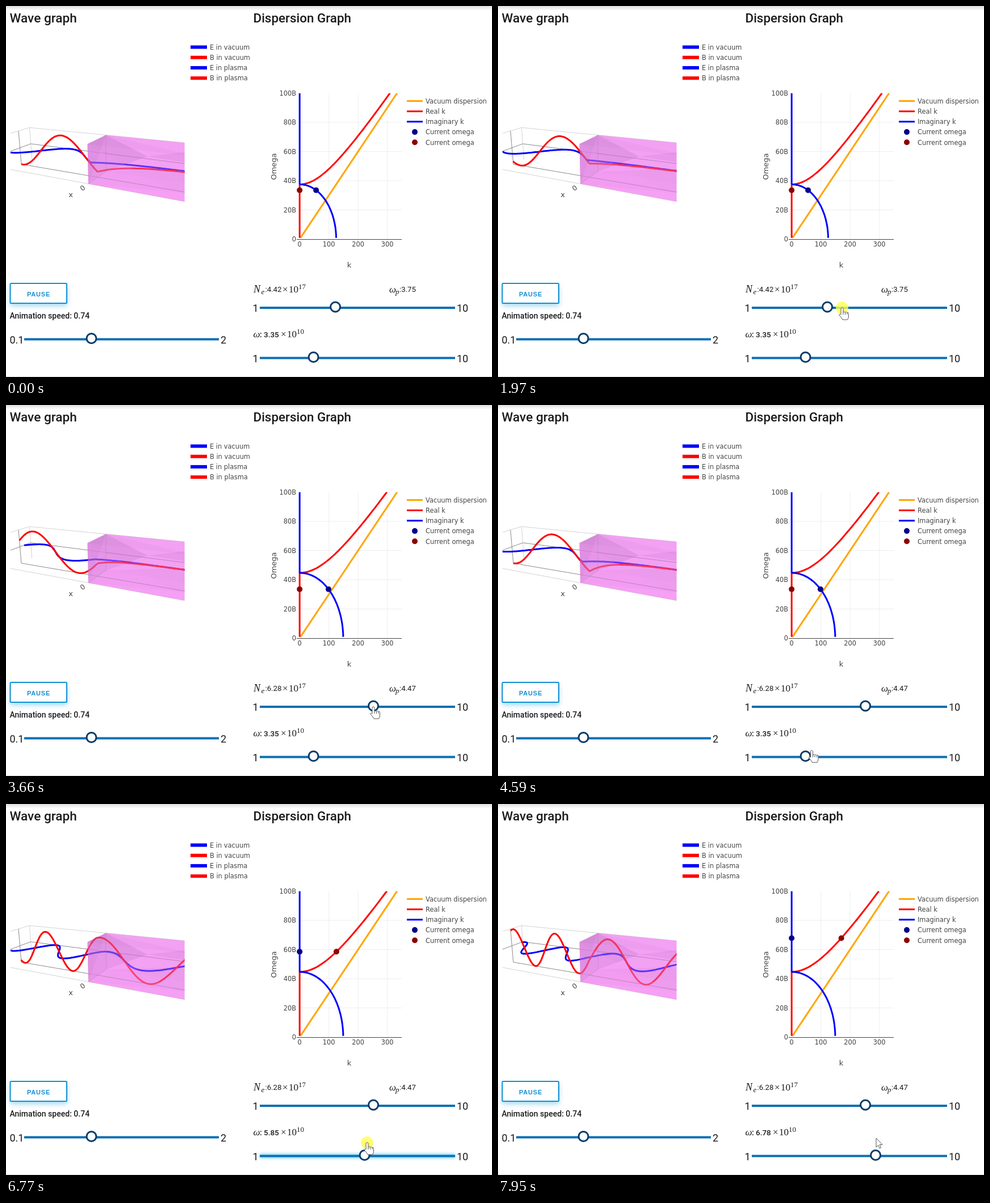
An HTML page that plays this animation: 856 px wide and 654 px high, repeating every 8 s.

```html
<!DOCTYPE html>
<html lang="en">
<head>
<meta charset="utf-8">
<title>Wave and dispersion</title>
<style>
  html, body { margin: 0; width: 100%; height: 100%; overflow: hidden; background: #fff; }
  svg { display: block; width: 100vw; height: 100vh; }
  .plot { font-family: "DejaVu Sans", sans-serif; font-size: 11.4px; fill: #444; }
  .ui { font-family: Roboto, sans-serif; fill: #1b1b1b; }
  .math { font-family: "Liberation Serif", serif; fill: #1b1b1b; font-size: 17px; }
  .it { font-style: italic; }
  .thin, .dark { fill: none; stroke: #d2d2d2; stroke-width: 1; }
  .dark { stroke: #8a8a8a; }
  .faint { stroke-opacity: .35; }
  .wave { fill: none; stroke-width: 3; stroke-linejoin: round; }
</style>
</head>
<body>
<svg id="stage" viewBox="0 0 856 654"></svg>
<script>
const LOOP = 8000;
const BLUE = '#0000ff', RED = '#ff0000', NAVY = '#00008b', MAROON = '#8b0000';
const stage = document.getElementById('stage');

// [first, last, count] of evenly spaced picture updates
const BURSTS = [[70, 870, 12], [940, 1730, 11], [1890, 2660, 11], [2830, 3580, 11],
  [3660, 4440, 11], [4530, 5320, 11], [5380, 6160, 11], [6240, 7020, 11],
  [7090, 7490, 6], [7640, 7950, 5]];
const ticks = [0];
for (const [a, b, n] of BURSTS)
  for (let i = 0; i < n; i++) ticks.push(a + (b - a) * i / (n - 1));

// Keys: [time, value, ...]
const PHASE = [[0, -2.35], [1098, 8.26], [1967, 17.01], [3660, 33.3], [5614, 50.37],
  [6786, 63.05], [7950, 83.42]];
const DENSITY = [[2010, 4.42], [2030, 5.15], [2400, 5.26], [3400, 6.28]];
const OMEGA = [[5300, 3.35], [5614, 3.69], [6160, 4.95], [6786, 5.85], [7020, 6.1], [7450, 6.78]];
const POINTER = [[0, 750, 675], [100, 735, 640], [870, 606, 548], [1090, 603, 542],
  [1500, 603, 542], [1890, 606, 532], [2030, 606, 532], [2400, 611, 532], [3400, 647, 532],
  [3700, 647, 532], [4440, 560, 605], [4850, 542, 615], [5250, 542, 615], [5614, 566, 614],
  [6160, 603, 606], [6786, 636, 597], [7020, 643, 596], [7450, 665, 595], [7700, 666, 589]];

function at(keys, t, col = 1) {
  const i = keys.findIndex(k => k[0] > t);
  if (i < 0) return keys[keys.length - 1][col];
  if (i === 0) return keys[0][col];
  const a = keys[i - 1], b = keys[i];
  return a[col] + (b[col] - a[col]) * (t - a[0]) / (b[0] - a[0]);
}
const within = (t, a, b) => t >= a && t < b;

// Perspective view: x along the wave, plasma starts at x = 0
function project(x, y, z) {
  const d = 1 - .15 * x + .052 * y - .0173 * z;
  return [(161 + 132.8 * x + 24.2 * y - 3.28 * z) / d,
          (269 - 18.5 * x + 4.5 * y - 38.06 * z) / d];
}
const fix = p => p.map(v => v.toFixed(1)).join(' ');
const path = pts => 'M' + pts.map(fix).join('L');
const solid = pts => path(pts.map(p => project(...p)));
function curve(f, a, b, n = 120) {
  return path(Array.from({ length: n + 1 }, (_, i) => f(a + (b - a) * i / n)));
}

// Dispersion axes
const kx = k => 517.2 + k * .515;
const wy = w => 411 - w * 2.575;
const sliderX = v => 457 + (v - 1) * 36;

const text = (x, y, s, cls, extra = '') => `<text x="${x}" y="${y}" class="${cls}" ${extra}>${s}</text>`;
const line = (x1, y1, x2, y2, color, w) =>
  `<line x1="${x1}" y1="${y1}" x2="${x2}" y2="${y2}" stroke="${color}" stroke-width="${w}"/>`;
const edge = (cls, ...pts) => `<path class="${cls}" d="${solid(pts)}"/>`;
const face = (color, alpha, ...pts) => `<path d="${solid(pts)}Z" fill="${color}" fill-opacity="${alpha}"/>`;
const dot = (id, x, y, color) => `<circle id="${id}" cx="${x}" cy="${y}" r="5" fill="${color}"/>`;
const wave = (id, color) => `<path id="${id}" class="wave" stroke="${color}"/>`;

function slider(id, x1, x2, y, lo, hi, xLo, knob) {
  return `<line id="${id}Glow" x1="${x1}" y1="${y}" x2="${x2}" y2="${y}" stroke="#55c3f2" stroke-opacity=".7" stroke-width="8" filter="url(#soft)" visibility="hidden"/>`
    + line(x1, y, x2, y, '#0c6fb2', 4)
    + text(xLo, y + 7, lo, 'ui', 'font-size="18"') + text(x2 + 3, y + 7, hi, 'ui', 'font-size="18"')
    + `<circle id="${id}Knob" cx="${knob}" cy="${y - 1.5}" r="8.5" fill="#fff" stroke="#073b69" stroke-width="3"/>`;
}

function power(x, y, exp) {
  return text(x, y, '×', 'math') + text(x + 11, y, '10', 'math')
    + text(x + 28, y - 6, exp, 'math', 'style="font-size:13px"');
}

function waveScene() {
  const violet = '#ee82ee', shade = '#7a4a86';
  const A = [0, -1, 1], B = [0, 1, 1], C = [0, 1, -1], D = [0, -1, -1];
  const A2 = [1, -1, 1], B2 = [1, 1, 1], C2 = [1, 1, -1], D2 = [1, -1, -1];
  const mid = [.45, 1, .12];
  return `<g clip-path="url(#view)">`
    + edge('thin', [-1, -1, 1], [-1, 1, 1], B2)
    + edge('thin', [-1, 1, 1], [-1, 1, -1])
    + edge('thin', [-1, -1, -1], D2)
    + edge('dark', [-1, -1, 0], [-1, 1, 0], [1, 1, 0])
    + edge('dark', [-1, 0, 1], [-1, 0, -1], [1, 0, -1])
    + face(violet, .6, A, B, B2, D2, D)
    + face(shade, .2, B, mid, C)
    + face(shade, .14, mid, [1, 1, .8], [1, 1, .05])
    + face(shade, .1, C, [1, 1, -.1], C2)
    + face(shade, .07, D, C, C2, [1, 0, -1])
    + wave('eVac', BLUE) + wave('bVac', RED) + wave('ePla', BLUE) + wave('bPla', RED)
    + face(violet, .38, A, B, B2, D2, D)
    + face(shade, .14, A, B, C, D)
    + face(shade, .08, A, B, D)
    + face(shade, .05, A, B, A2)
    + face('#ff9cff', .16, A, D2, D)
    + edge('dark faint', B, C, D)
    + edge('dark faint', [0, 1, 0], [1, 1, 0])
    + edge('dark faint', [0, 0, -1], [1, 0, -1])
    + `</g>`
    + text(0, 4, '0', 'plot', 'text-anchor="middle" transform="translate(135 321) rotate(-35)" style="font-size:12px"')
    + text(114, 337, 'x', 'plot', 'text-anchor="middle" style="font-size:13px"');
}

function waveLegend() {
  return ['E in vacuum', 'B in vacuum', 'E in plasma', 'B in plasma'].map((s, i) => {
    const y = 72.5 + i * 18.2;
    return line(325, y, 354, y, i % 2 ? RED : BLUE, 6) + text(359, y + 4.2, s, 'plot');
  }).join('');
}

function dispersion() {
  let s = '';
  for (let k = 0; k <= 300; k += 100) {
    if (k) s += line(kx(k), 153.5, kx(k), 411, '#eee', 1);
    s += text(kx(k), 424, k, 'plot', 'text-anchor="middle"');
  }
  for (let w = 0; w <= 100; w += 20) {
    if (w && w < 100) s += line(517, wy(w), 697, wy(w), '#eee', 1);
    s += text(511, wy(w) + 4, w ? w + 'B' : 0, 'plot', 'text-anchor="end"');
  }
  s += line(512, 411.5, 697, 411.5, '#444', 1)
    + `<g clip-path="url(#axes)">` + line(kx(3), wy(.9), kx(333.3), wy(100), '#ffa500', 3)
    + wave('realK', RED) + wave('imagK', BLUE) + `</g>`
    + dot('dotIm', 0, 0, NAVY) + dot('dotRe', 0, 0, MAROON)
    + text(0, 0, 'Omega', 'plot', 'text-anchor="middle" transform="translate(475.5 283) rotate(-90)" style="font-size:13px"')
    + text(604.5, 461, 'k', 'plot', 'text-anchor="middle" style="font-size:13px"');
  ['Vacuum dispersion', 'Real k', 'Imaginary k', 'Current omega', 'Current omega'].forEach((label, i) => {
    const y = 167.5 + i * 18.2;
    s += i < 3 ? line(706, y, 734, y, ['#ffa500', RED, BLUE][i], 3)
               : dot('key' + i, 720, y, i === 3 ? NAVY : MAROON);
    s += text(739, y + 4.2, label, 'plot');
  });
  return s;
}

function controls() {
  return `<rect x="7" y="493" width="101" height="36" rx="2" fill="#6cc4ee" opacity=".6" filter="url(#softer)"/>
    <rect x="7.5" y="489" width="99.5" height="35" rx="1.5" fill="#fff" stroke="#0d90d4" stroke-width="2"/>`
    + text(57.5, 511.5, 'PAUSE', 'pause', 'text-anchor="middle" font-family="Liberation Sans, sans-serif" font-weight="700" font-size="11" letter-spacing=".8" fill="#148fd2"')
    + text(6.5, 550.5, 'Animation speed: 0.74', 'ui', 'font-size="14" font-weight="500"')
    + slider('speed', 32, 375, 587.5, '0.1', '2', 6.5, 150.5)
    + text(436, 505, 'N', 'math it', 'style="font-size:18px"') + text(449.5, 508, 'e', 'math it', 'style="font-size:13px"')
    + text(456.5, 504, '', 'ui', 'id="density" font-size="13.2"') + power(487, 505, 17)
    + text(675, 505, 'ω', 'math it') + text(686, 508, 'p', 'math it', 'style="font-size:13px"')
    + text(693, 504, '', 'ui', 'id="plasma" font-size="13.2"')
    + slider('ne', 447, 791, 532, 1, 10, 434.5, 580)
    + text(435.5, 584, 'ω', 'math it') + text(447, 583.5, ':', 'ui', 'font-size="14" font-weight="500"')
    + text(454, 583.5, '', 'ui', 'id="omega" font-size="13.5" font-weight="500"') + power(484, 584, 10)
    + slider('om', 447, 791, 620.5, 1, 10, 434.5, 541.6);
}

const blur = (id, size) => `<filter id="${id}" filterUnits="userSpaceOnUse" x="0" y="470" width="856" height="184">
    <feGaussianBlur stdDeviation="${size}"/></filter>`;

stage.innerHTML = `<defs>
    <clipPath id="view"><rect x="8" y="150" width="306.5" height="240"/></clipPath>
    <clipPath id="axes"><rect x="514" y="153.5" width="184" height="258"/></clipPath>
    ${blur('soft', 2.5)}${blur('softer', 4)}
    <linearGradient id="top" x2="0" y2="1"><stop stop-color="#dedede"/><stop offset="1" stop-color="#fff"/></linearGradient>
  </defs>
  <rect width="856" height="654" fill="#fff"/><rect width="856" height="8" fill="url(#top)"/>`
  + line(0, 653.5, 856, 653.5, '#dcdcdc', 1)
  + text(6.5, 29, 'Wave graph', 'ui', 'font-size="22.6" font-weight="500"')
  + text(435.5, 29, 'Dispersion Graph', 'ui', 'font-size="22.4" font-weight="500"')
  + waveLegend() + waveScene() + dispersion() + controls()
  + `<g id="pointer" fill="#fff" stroke="#555" stroke-width="1" stroke-linejoin="round">
    <circle id="press" r="11" fill="#ffff50" fill-opacity=".8" stroke="none"/>
    <path id="arrow" d="M0 0V16L3.7 12.5 6 18 8.5 17 6.2 11.5H11Z"/>
    <path id="hand" d="M-2 1q2-3 4 0V8q2-2 3.5 0 2-1.5 3.5.5 2.5-1 2.5 2V15q0 3-2 6H1Q-1 17-5 13q0-3 3-1ZM2 8v4M5.5 8.5v3.5M9 9v3"/>
  </g>`;

const el = {};
stage.querySelectorAll('[id]').forEach(n => el[n.id] = n);
const set = (id, attrs) => { for (const a in attrs) el[id].setAttribute(a, attrs[a]); };
const show = (id, on) => set(id, { visibility: on ? 'visible' : 'hidden' });

function drawWaves(w, wp, phase) {
  const half = .05, scale = 10 / .3 * half;
  const k = w * scale, kp = Math.sqrt(Math.abs(w * w - wp * wp)) * scale;
  const vac = x => Math.cos(k * x - phase);
  const pla = x => w > wp ? Math.cos(kp * x - phase) : Math.cos(phase) * Math.exp(-kp * x);
  set('eVac', { d: curve(x => project(x, vac(x), 0), -1, 0) });
  set('bVac', { d: curve(x => project(x, 0, vac(x)), -1, 0) });
  set('ePla', { d: curve(x => project(x, pla(x), 0), 0, 1) });
  set('bPla', { d: curve(x => project(x, 0, pla(x)), 0, 1) });
}

function drawDispersion(w, wp) {
  const k = v => Math.sqrt(Math.abs(v * v - wp * wp)) * 10 / .3;
  const re = v => [kx(v > wp ? k(v) : 0), wy(v * 10)];
  const im = v => [kx(v < wp ? k(v) : 0), wy(v * 10)];
  // denser samples near the cut-off, where k changes fastest
  const above = u => wp + (10 - wp) * u * u, below = u => wp - (wp - .09) * u * u;
  set('realK', { d: path([re(.09), re(wp)]) + curve(u => re(above(u)), 0, 1, 40) });
  set('imagK', { d: path([im(10), im(wp)]) + curve(u => im(below(u)), 0, 1, 40) });
  const [ix, y] = im(w), [rx] = re(w);
  set('dotIm', { cx: ix, cy: y });
  set('dotRe', { cx: rx, cy: y });
}

function draw(time) {
  let t = 0;
  for (const tick of ticks) if (tick <= time + 18) t = tick;
  const ne = at(DENSITY, t), w = at(OMEGA, t), wp = 1.784 * Math.sqrt(ne);

  drawWaves(w, wp, at(PHASE, t));
  drawDispersion(w, wp);
  set('neKnob', { cx: sliderX(ne) });
  set('omKnob', { cx: sliderX(w) });
  el.density.textContent = ':' + ne.toFixed(2);
  el.plasma.textContent = ':' + wp.toFixed(2);
  el.omega.textContent = w.toFixed(2);

  show('neGlow', within(t, 2020, 3600));
  show('omGlow', within(t, 4850, 7600));
  const hand = within(t, 1850, 3750) || within(t, 4500, 7600);
  show('press', within(t, 1930, 3600) || within(t, 4850, 7600));
  show('hand', hand);
  show('arrow', !hand);
  set('pointer', { transform: `translate(${at(POINTER, t)} ${at(POINTER, t, 2)})` });
}

const start = performance.now();
function loop() {
  draw((performance.now() - start) % LOOP);
  requestAnimationFrame(loop);
}
loop();
</script>
</body>
</html>
```
